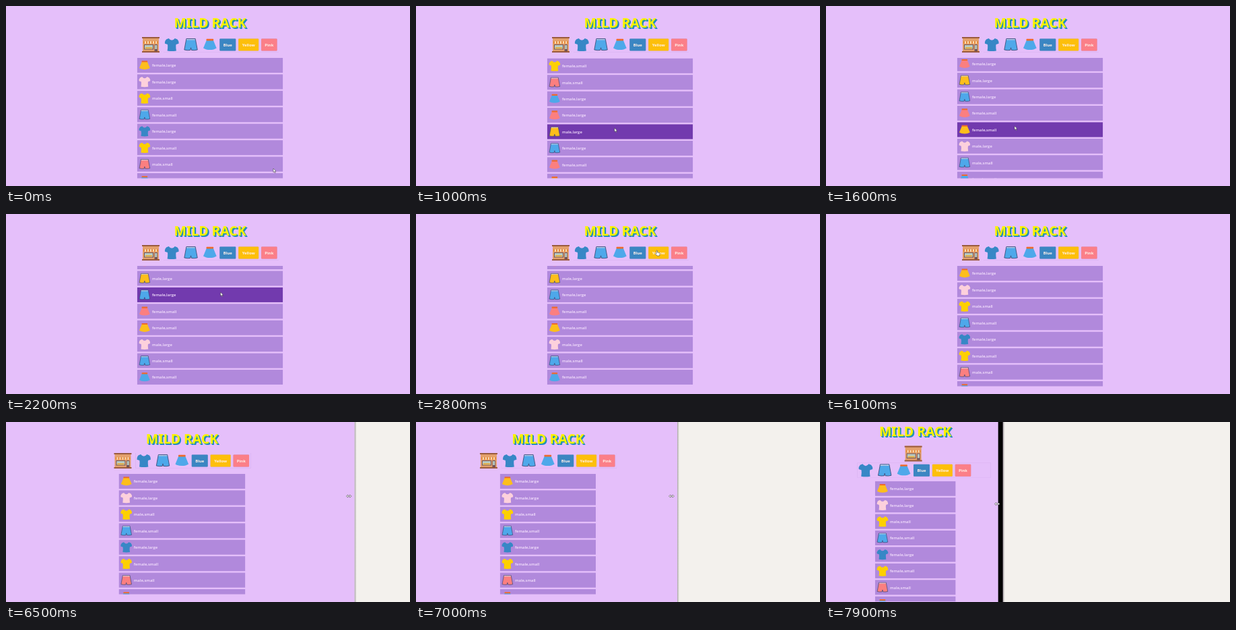
An HTML page for the animation above (8 s loop, 600 px wide and 267 px high).

```html
<!DOCTYPE html>
<html lang="en">
<head>
<meta charset="utf-8">
<title>Clothes list</title>
<style>
html, body { margin: 0; height: 100%; overflow: hidden; background: #e5bffa; }
svg { display: block; width: 100%; height: 100%; }
text { font: 600 5.9px "Open Sans", "Noto Sans", sans-serif; }
.title { font: 700 19.4px "Noto Sans", "Open Sans", sans-serif; text-anchor: middle; }
.btn { font-weight: 700; text-anchor: middle; }
.box { filter: drop-shadow(.3px .7px .7px #7d4fa84d); }
symbol { overflow: visible; }
</style>
</head>
<body>
<svg viewBox="0 0 600 267">
  <defs>
    <symbol id="shirt" viewBox="0 0 20 20">
      <path fill="currentColor" d="M5.5 1Q10 6.5 14.5 1L18 2.5Q20.5 5 20 8.5L16.2 9.8Q15.5 13 16.5 19Q10 20 3.5 19Q4.5 13 3.8 9.8L0 8.5Q-.5 5 2 2.5Z"/>
    </symbol>
    <symbol id="pants" viewBox="0 0 20 20">
      <path fill="currentColor" stroke="#35436f" stroke-width=".8" stroke-linejoin="round" d="M3.5 1.5H16.5L19.5 17.5Q15 18.8 10.8 18L10 14.5L9.2 18Q5 18.8 .5 17.5Z"/>
      <path stroke="#d8d3e0" stroke-width="1.6" stroke-dasharray="1.6 .6" d="M4 2.7H16"/>
    </symbol>
    <symbol id="skirt" viewBox="0 0 20 20">
      <path fill="currentColor" d="M5.2 3.5H14.8L19.6 15Q16 17.5 10 17.5T.4 15Z"/>
      <rect x="4.8" y="1.8" width="10.4" height="2.6" rx=".8" fill="#ee6a2c"/>
    </symbol>
    <symbol id="store" viewBox="0 0 26 23">
      <path fill="#e3a06c" d="M1 0H25V22H1Z"/>
      <path fill="#9a5a3c" d="M0 0H26V2H0ZM0 21H26V23H0Z"/>
      <path stroke="#e58a3c" stroke-width="3.5" d="M2 8H24"/>
      <path stroke="#f8dcb8" stroke-width="3.5" stroke-dasharray="2" d="M4 8H23"/>
      <path fill="#705258" d="M3 11H17V18.5H3ZM18.5 11H23V21H18.5Z"/>
      <path fill="#b8ccc4" d="M4 12H16V17.5H4ZM19.3 12H22.2V18H19.3Z"/>
      <path fill="#e0b050" d="M5 15H15V17.5H5Z"/>
    </symbol>
    <symbol id="arrow"><path fill="#fff" stroke="#333" stroke-width=".5" d="M0 0V5.6L1.3 4.5L2.3 6.6L3.2 6.2L2.3 4.1H4Z"/></symbol>
    <symbol id="hand"><path fill="#fff" stroke="#222" stroke-width=".5" d="M0 .5Q.8-.4 1.5.5V3L4.5 3.6Q5.4 4 5.2 5L4.6 8H1L-1.5 5Q-1.2 4 0 4.8Z"/></symbol>
    <symbol id="resize"><path fill="#fff" stroke="#333" stroke-width=".5" d="M-4 0L-1.5-2V-.7H1.5V-2L4 0L1.5 2V.7H-1.5V2Z"/></symbol>
    <linearGradient id="edge"><stop stop-color="#aaa6a8"/><stop offset="1" stop-color="#f3f1ed"/></linearGradient>
    <clipPath id="view"><rect y="77" width="600" height="178.5"/></clipPath>
  </defs>
  <g id="scene"></g>
</svg>
<script>
const scene = document.getElementById('scene');
const LOOP = 8000, STEP = 100, PITCH = 24.43, TOP = 77, ROW_H = 22;

const items = `skirt yellow female,large
shirt pink female,large
shirt yellow male,small
pants blue female,small
shirt blue female,large
shirt yellow female,small
pants pink male,small
skirt blue female,large
skirt pink female,large
pants yellow male,large
pants blue female,large
skirt pink female,small
skirt yellow female,small
shirt pink male,large
pants blue male,small
skirt blue female,small`.split('\n').map(line => line.split(' '));

const shirtTint = { blue: '#3787c6', yellow: '#fdd000', pink: '#fdd0dc' };
const tint = { blue: '#4ea8ea', yellow: '#fdbe1c', pink: '#fb7f80' };

// pointer stops; a stop with a pick clicks that filter
const stops = [
  { t: 0, x: 397, y: 241, pick: '' },
  { t: 300, x: 508, y: 190 },
  { t: 700, x: 300, y: 182 },
  { t: 1600, x: 280, y: 178 },
  { t: 2800, x: 357, y: 54 },
  { t: 3000, x: 358, y: 55, pick: 'yellow' },
  { t: 3800, x: 390, y: 56, pick: 'pink' },
  { t: 4500, x: 292, y: 59, pick: 'skirt' },
  { t: 4800, x: 275, y: 57, pick: 'pants' },
  { t: 5100, x: 248, y: 57, pick: 'shirt' },
  { t: 5400, x: 214, y: 57, pick: '' },
  { t: 5700, x: 620, y: 130 }
];

const progress = (t, from, to) => Math.min(1, Math.max(0, (t - from) / (to - from)));
const easeOut = (t, from, to) => 1 - (1 - progress(t, from, to)) ** 2;

function pointer(t) {
  const i = Math.max(1, stops.findIndex(s => s.t > t));
  const a = stops[i - 1], b = t < 5700 ? stops[i] : stops.at(-1);
  const p = progress(t, a.t, b.t), k = p * p * (3 - 2 * p);
  return t < 5700 ? { x: a.x + (b.x - a.x) * k, y: a.y + (b.y - a.y) * k } : b;
}

const scrolled = t => t >= 3000 ? 0 :
  62 * easeOut(t, 500, 700) + 135.7 * easeOut(t, 900, 1300) + 14.7 * easeOut(t, 1600, 1900);

// the window border is dragged left in four pulls
const border = t => 600 - 144 * progress(t, 6100, 6800) - 90.7 * easeOut(t, 6900, 7100) -
  51.3 * (easeOut(t, 7200, 7400) + easeOut(t, 7700, 7900));

const rect = (x, y, w, h, fill, more = '') =>
  `<rect x="${x}" y="${y}" width="${w}" height="${h}" fill="${fill}" ${more}/>`;
const icon = (id, x, y, w, h, color) =>
  `<use href="#${id}" x="${x}" y="${y}" width="${w}" height="${h}" color="${color}"/>`;
const sign = (id, x, y) => `<use href="#${id}" x="${x}" y="${y}"/>`;
const text = (s, x, y, fill, cls = '') => `<text x="${x}" y="${y}" fill="${fill}" class="${cls}">${s}</text>`;
const shift = (dy, s) => `<g transform="translate(0 ${dy})">${s}</g>`;

function header(mid, narrow) {
  const title = ['#1a82d0', '#35a58c', '#fff200']
    .map((fill, i) => text('MILD RACK', mid + 2.2 - i * 1.1, 33.5 - i, fill, 'title')).join('');
  const logo = icon('store', mid - (narrow ? 16 : 101), 46, 26, 23);

  let x = mid - (narrow ? 84 : 67);
  let nav = rect(x - 2, 46, narrow ? 198 : 171, 22.5, '#e5bffa', 'class="box"');
  for (const id of ['shirt', 'pants', 'skirt']) {
    nav += icon(id, x, 47, 20.5, 20.5, (id === 'shirt' ? shirtTint : tint).blue);
    x += 28.3;
  }
  x -= 3.6;
  for (const [label, w, fill] of [['Blue', 24, '#3b86c2'], ['Yellow', 30, '#fdbf0b'], ['Pink', 23.5, '#fb7f88']]) {
    nav += rect(x, 48.5, w, 18, fill, 'rx="1" class="box"') + text(label, x + w / 2, 59.6, '#fff0e8', 'btn');
    x += w + 3.9;
  }
  return shift(narrow ? -10.5 : 0, title + logo) + shift(narrow ? 14.3 : 0, nav);
}

function list(t, mid, narrow, mouse) {
  const width = narrow ? mid * .9 : mid * .692 + 6.5;
  const x = mid - width / 2;
  const { pick } = stops.findLast(s => s.t <= t && 'pick' in s);
  const hovering = t > 0 && t < 2500 && mouse.y > TOP && Math.abs(mouse.x - mid) < width / 2;
  const rows = items.filter(item => !pick || item.includes(pick)).map(([kind, color, label], i) => {
    const y = TOP - scrolled(t) + i * PITCH;
    const over = hovering && mouse.y > y && mouse.y < y + ROW_H;
    return rect(x, y, width, ROW_H, over ? '#723aae' : '#b189dc') +
      icon(kind, x + 2.7, y + 2.7, 16.5, 16.5, (kind === 'shirt' ? shirtTint : tint)[color]) +
      text(label, x + 22, y + 13.4, '#f7e4fe');
  }).join('');
  return shift(narrow ? 10.7 : 0, `<g clip-path="url(#view)">${rows}</g>`);
}

function render(t) {
  const edge = border(t), mid = edge * .505, narrow = edge < 330, mouse = pointer(t);
  let out = header(mid, narrow) + list(t, mid, narrow, mouse);
  if (edge < 600) {
    out += rect(edge, 0, 600 - edge, 267, '#f3f1ed') + rect(edge, 0, 3, 267, 'url(#edge)');
    if (t >= 7800) out += rect(edge - 7, 0, 7, 267, '#000');
    out += sign('resize', edge - 8.5, 110 + 11.5 * progress(t, 7000, 7900));
  } else {
    const overNav = mouse.y > 46 && mouse.y < 68 && mouse.x < 405;
    out += sign(overNav ? 'hand' : 'arrow', mouse.x, mouse.y);
  }
  scene.innerHTML = out;
}

let last = -1;
function tick() {
  const t = Math.floor(performance.now() % LOOP / STEP) * STEP;
  if (t !== last) render(last = t);
  requestAnimationFrame(tick);
}
tick();
</script>
</body>
</html>
```
